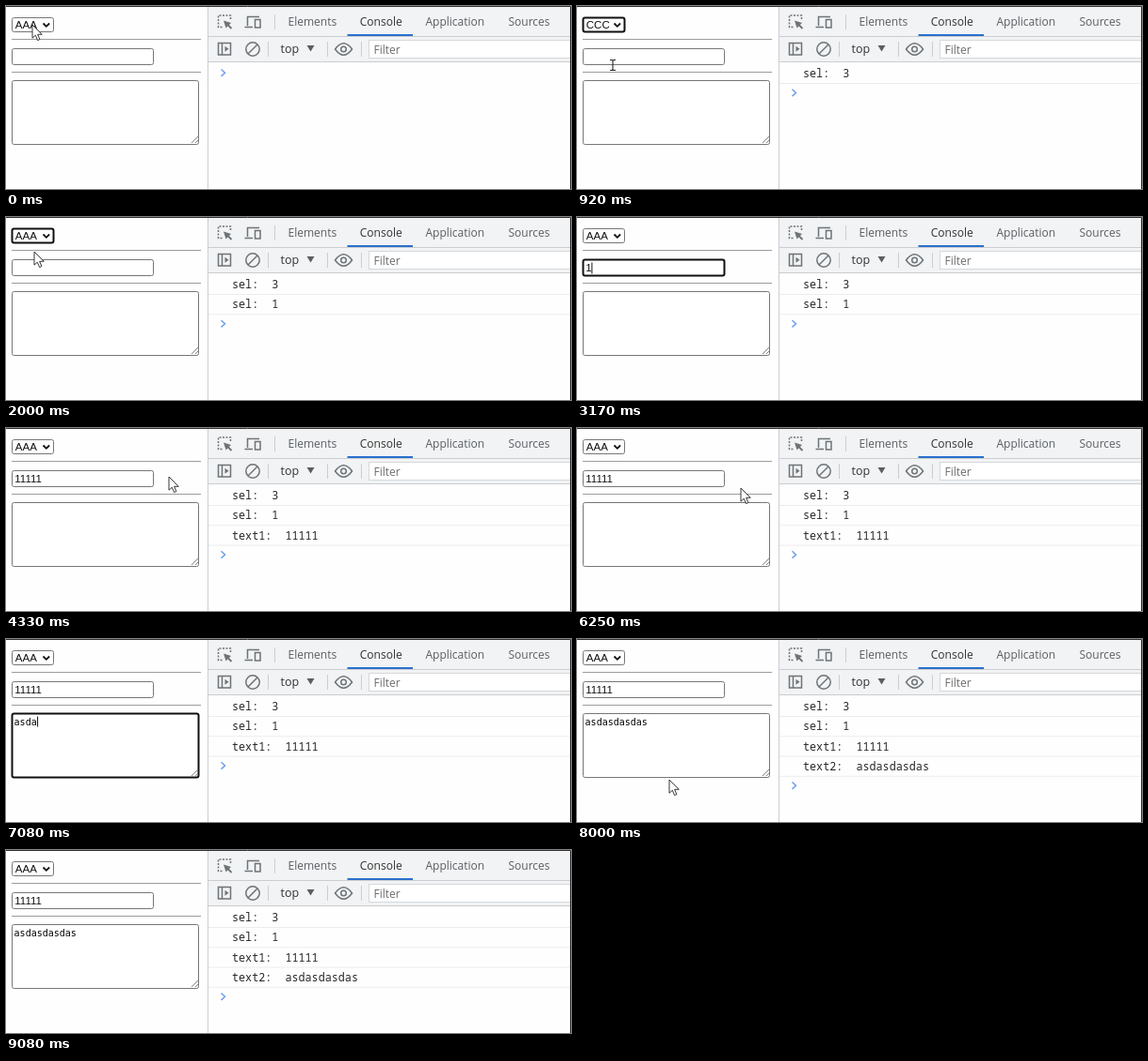
Animation, 600 px wide and 195 px high, one loop 9580 ms. Source, as an HTML page:

```html
<!DOCTYPE html>
<html lang="en">
<head>
<meta charset="utf-8">
<title>Form events</title>
<style>
html, body { margin: 0; width: 100%; height: 100%; overflow: hidden; background: #fff; }
svg { display: block; width: 600px; height: 195px; }
text { white-space: pre; }
.ui { font: 12px "Open Sans", sans-serif; fill: #5a5e63; }
.form { font: 11.5px "Liberation Sans", Arial, sans-serif; fill: #111; }
.mono { font: 11.75px "Noto Sans Mono", monospace; fill: #282828; }
.area { font: 10px "DejaVu Sans Mono", monospace; fill: #000; }
.box { fill: #fff; stroke: #767676; }
.focus { stroke: #101010; stroke-width: 2; }
.icon { fill: none; stroke: #6e7377; stroke-width: 1.5; }
.rule { stroke: #cbcdd1; }
.hidden { display: none; }
</style>
</head>
<body>
<svg viewBox="0 0 600 195">
  <rect width="600" height="195" fill="#fefefe"/>

  <!-- form -->
  <path d="M6 35.5H207M6 70.5H207" stroke="#9c9c9c"/>
  <rect id="sel" class="box" x="6.5" y="12.5" width="44" height="15" rx="2"/>
  <text id="choice" class="form" x="9.8" y="24"></text>
  <path d="M39.5 18.5l3.300 3.300 3.300-3.300" fill="none" stroke="#111" stroke-width="1.8"/>
  <rect id="input" class="box" x="6.5" y="45.5" width="150" height="17" rx="2"/>
  <text id="digits" class="form" x="9.3" y="58"></text>
  <rect id="area" class="box" x="6.5" y="79.5" width="198" height="68" rx="2"/>
  <path d="M197 146l7-7M201 146l3-3" stroke="#777" stroke-width=".9"/>
  <text id="letters" class="area" x="8.6" y="91.5"></text>
  <path id="caret" stroke="#111"/>

  <!-- developer tools -->
  <rect x="215" width="385" height="59.5" fill="#f1f3f4"/>
  <path class="rule" d="M214.5 1V195M215 32.5H599M215 59.5H599M285.5 9V25M278.5 38V54M341.5 38V54M377.5 38V54"/>
  <g class="icon">
    <path d="M238.5 14V10H225.500V22.500H230" stroke-dasharray="2 1.500"/>
    <path d="M239.500 24l-5-5" stroke-width="1.800"/>
    <path d="M231 15.500l8 2.500-5.500 5.500z" fill="#6e7377" stroke="none"/>
    <path d="M256.500 21V11.500H269M253.500 22.500H262"/>
    <rect x="264.500" y="14.500" width="5.500" height="8.500"/>
    <rect x="225.500" y="39.500" width="13" height="12.500"/>
    <path d="M229.500 39.500V52"/>
    <path d="M232.500 42.800l4 3-4 3z" fill="#6e7377" stroke="none"/>
    <circle cx="262" cy="46" r="7.200"/>
    <path d="M257 51l10-10"/>
    <path d="M349.500 46Q358.500 33.500 367.500 46Q358.500 58.500 349.500 46Z"/>
    <circle cx="358.500" cy="46" r="2.800"/>
  </g>
  <g class="ui">
    <text x="299.500" y="21">Elements</text>
    <text x="375.800" y="21" style="fill:#333">Console</text>
    <text x="445.500" y="21">Application</text>
    <text x="533.500" y="21">Sources</text>
    <text x="291.500" y="50" style="font-size:12.5px;fill:#333">top</text>
    <path d="M319.500 42h8l-4 6.500z"/>
    <rect x="385.500" y="36.500" width="216" height="19" fill="#fff" stroke="#d6d8db"/>
    <text x="390.500" y="51" style="fill:#6c6c6c">Filter</text>
  </g>
  <rect x="362.500" y="30" width="69.500" height="2" fill="#2a70cc"/>
  <g id="log"></g>
  <path id="prompt" d="M228.500 67.500l4 3.700-4 3.700" fill="none" stroke="#6fa0ee" stroke-width="1.500"/>
  <path d="M0 .5H599.500V195" fill="none" stroke="#303030"/>

  <g id="popup"></g>
  <path id="arrow" d="M0 0V14.200L3.300 11.200 5.600 16.600 7.900 15.600 5.600 10.300H10.200Z" fill="#fff" stroke="#222" stroke-width=".9"/>
  <path id="beam" d="M-3-5.500H-1Q0-5.500 0-4.500Q0-5.500 1-5.500H3M0-5V5M-3 5.500H-1Q0 5.500 0 4.500Q0 5.500 1 5.500H3" fill="none" stroke="#222" stroke-width="1.100"/>
</svg>
<script>
const LOOP = 9580;
const $ = id => document.getElementById(id);
const within = (k, spans) => spans.some(([a, b]) => k >= a && k < b);
const show = (el, on) => el.classList.toggle("hidden", !on);
const place = (el, x, y) => el.setAttribute("transform", `translate(${x} ${y})`);

// All times below are ticks of 1/12 s.
const path = [
  [1, 28, 20], [2, 29, 21], [7, 38, 58], [10, 38, 58], [11, 38, 63],
  [15, 34, 20], [16, 34, 20], [20, 30, 37], [24, 30, 37], [29, 80, 62],
  [44, 80, 62], [46, 120, 21], [48, 182, 50], [49, 182, 50], [50, 173, 52],
  [52, 173, 52], [54, 122, 60], [57, 122, 60], [60, 203, 51], [64, 203, 51],
  [67, 150, 59], [69, 150, 59], [72, 180, 51], [74, 180, 51], [75, 174, 64],
  [79, 110, 105], [92, 110, 105], [94, 100, 159], [96, 98, 150],
  [98, 100, 120], [100, 100, 120], [103, 150, 166], [104, 152, 167], [107, 224, 163]
];
const unseen = [[36, 45], [82, 93], [107, 116]];
const opened = [[2, 11], [16, 24]];
const focused = {
  sel: [[2, 29]],
  input: [[30, 51], [56, 62], [68, 73]],
  area: [[80, 96], [99, 104]]
};
const digitTicks = [38, 40, 42, 44, 45];
const lines = [[11, "sel:  3"], [24, "sel:  1"], [51, "text1:  11111"], [96, "text2:  asdasdasdas"]];
const word = "asdasdasdas";
const rowGap = 21.25;

$("log").innerHTML = lines.map(([, s], i) => {
  const y = i * rowGap;
  return `<g><text class="mono" x="240" y="${76 + y}">${s}</text>
    <path d="M215 ${82.5 + y}H599" stroke="#ececec"/></g>`;
}).join("");
const rows = [...$("log").children];

$("popup").innerHTML = '<rect x="5.5" y="28.5" width="46" height="47" fill="#fff" stroke="#767676"/>' +
  ["AAA", "BBB", "CCC"].map((s, i) => `<g><rect x="6" y="${29 + i * 15.3}" width="45" height="15.4"/>
    <text class="form" x="9.8" y="${40.5 + i * 15.3}">${s}</text></g>`).join("");
const options = [...$("popup").querySelectorAll("g")];

function pointerAt(k) {
  const next = path.findIndex(p => p[0] > k);
  if (next < 1) return (next ? path[path.length - 1] : path[0]).slice(1);
  const [a, ax, ay] = path[next - 1], [b, bx, by] = path[next];
  const u = (k - a) / (b - a);
  return [ax + (bx - ax) * u, ay + (by - ay) * u];
}

function draw(ms) {
  const k = Math.floor((Math.floor(ms / 10) + .5) * .12);
  const [x, y] = pointerAt(k);
  const isOpen = within(k, opened);

  for (const id in focused) $(id).classList.toggle("focus", within(k, focused[id]));
  $("choice").textContent = k >= 11 && k < 24 ? "CCC" : "AAA";

  show($("popup"), isOpen);
  const over = y < 29 ? (k < 11 ? 0 : 2) : Math.min(2, Math.floor((y - 29) / 15.3));
  options.forEach((g, i) => {
    g.firstChild.style.fill = i === over ? "#1e74d8" : "#fff";
    g.lastElementChild.style.fill = i === over ? "#fff" : "#111";
  });

  const digits = digitTicks.filter(t => t <= k).length;
  const letters = Math.max(0, Math.min(word.length, k - 81));
  $("digits").textContent = "1".repeat(digits);
  $("letters").textContent = word.slice(0, letters);

  const inInput = within(k, focused.input), inArea = within(k, focused.area);
  show($("caret"), inInput || inArea);
  $("caret").setAttribute("d", inInput ? `M${9.5 + digits * 6.4} 48.500v12` : `M${9.5 + letters * 6.02} 82.500v11`);

  rows.forEach((row, i) => show(row, k >= lines[i][0]));
  place($("prompt"), 0, lines.filter(l => l[0] <= k).length * rowGap);

  const seen = !within(k, unseen);
  const onText = !isOpen && (x > 6 && x < 157 && y > 46 && y < 64 || x > 6 && x < 205 && y > 79 && y < 148);
  show($("arrow"), seen && !onText);
  show($("beam"), seen && onText);
  place($("arrow"), x, y);
  place($("beam"), x, y);
}

const start = performance.now();
function tick() {
  draw((performance.now() - start) % LOOP);
  requestAnimationFrame(tick);
}
tick();
</script>
</body>
</html>
```
